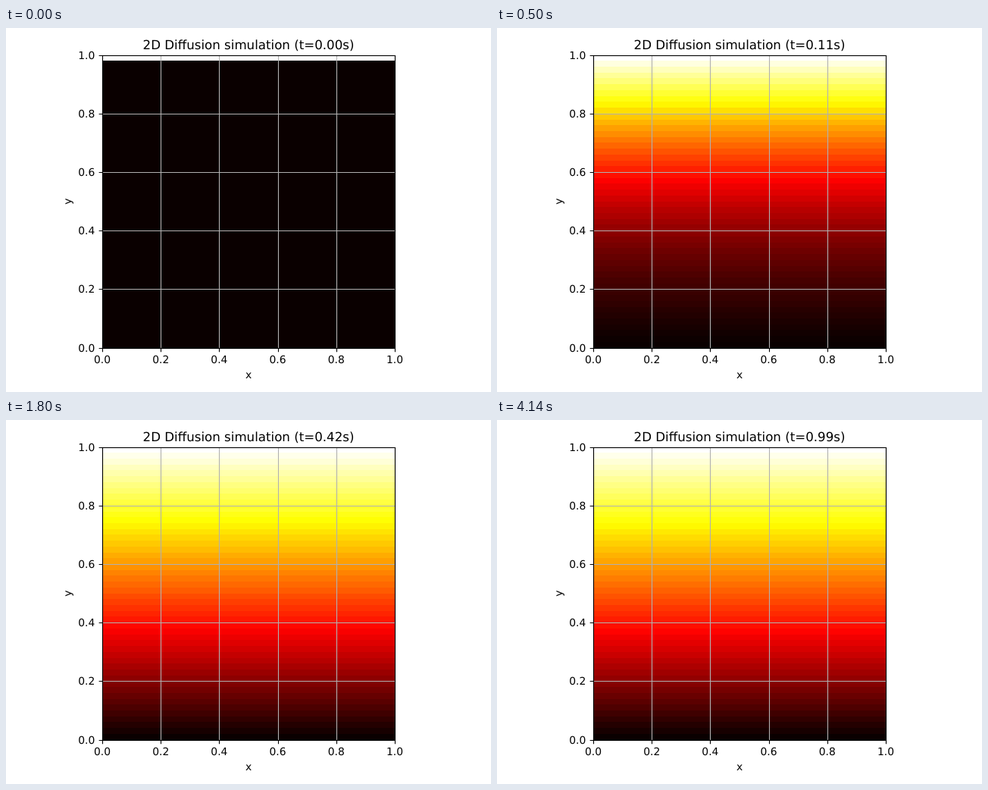
Animation of 640x480 px, one loop 4.16 s. Source, as an HTML page:

```html
<!DOCTYPE html>
<html lang="en">
<head>
<meta charset="utf-8">
<title>2D Diffusion simulation</title>
<style>
  html, body { margin: 0; width: 100%; height: 100%; overflow: hidden; background: #fff; }
  svg { display: block; width: 640px; height: 480px; }
  text { font: 13.889px "DejaVu Sans", sans-serif; text-anchor: middle; text-rendering: geometricPrecision; }
  .title { font-size: 16.667px; }
  .end { text-anchor: end; }
  path, .spine { fill: none; stroke: #000; stroke-width: 1.11; }
  .grid { stroke: #b0b0b0; }
</style>
</head>
<body>
<svg id="stage" viewBox="0 0 640 480"></svg>
<script>
const svg = document.getElementById('stage');
const LEFT = 127, TOP = 35.6, SIZE = 386, BOTTOM = TOP + SIZE;
const CELLS = 50, STEPS_PER_FRAME = 120, FRAMES = 80;
const FRAME_TIME = STEPS_PER_FRAME * 0.25 / (CELLS - 1) ** 2;
const CYCLE = 260, CYCLE_STARTS = [0, 20, 120, 140, 240];
const LOOP = CYCLE * FRAMES / CYCLE_STARTS.length;

function add(tag, attributes, content = '') {
  const node = document.createElementNS('http://www.w3.org/2000/svg', tag);
  for (const [name, value] of Object.entries(attributes)) node.setAttribute(name, value);
  node.textContent = content;
  return svg.appendChild(node);
}

// Explicit heat equation: hot top edge, cold bottom edge, uniform along x.
function simulate() {
  let field = Array(CELLS).fill(0);
  field[CELLS - 1] = 1;
  const history = [field];
  while (history.length < FRAMES) {
    for (let step = 0; step < STEPS_PER_FRAME; step++) {
      field = field.map((u, j) => j === 0 || j === CELLS - 1
        ? u : u + 0.25 * (field[j - 1] + field[j + 1] - 2 * u));
    }
    history.push(field);
  }
  return history;
}

// Black, red, yellow, white in 256 levels.
function hot(u) {
  const level = Math.min(255, Math.floor(u * 256)) / 255;
  const ramp = (from, to, base = 0) => {
    const part = Math.min(1, Math.max(0, (level - from) / (to - from)));
    return Math.floor(255 * (base + (1 - base) * part));
  };
  return `rgb(${ramp(0, 0.365079, 0.0416)},${ramp(0.365079, 0.746032)},${ramp(0.746032, 1)})`;
}

const snap = v => Math.round(v) + 0.5;

const bands = Array.from({ length: CELLS }, (_, j) => {
  const edge = k => Math.round(BOTTOM - k * SIZE / CELLS);
  return add('rect', { x: LEFT, y: edge(j + 1), width: SIZE, height: edge(j) - edge(j + 1) });
});

const ticks = Array.from({ length: 6 }, (_, i) => ({
  label: (i / 5).toFixed(1),
  x: LEFT + i * SIZE / 5,
  y: BOTTOM - i * SIZE / 5
}));

const x0 = snap(LEFT), x1 = snap(LEFT + SIZE), y0 = snap(TOP), y1 = snap(BOTTOM);
for (const { x, y } of ticks) {
  add('path', { class: 'grid', d: `M${snap(x)} ${y0}V${y1}M${x0} ${snap(y)}H${x1}` });
}
for (const { label, x, y } of ticks) {
  add('path', { d: `M${snap(x)} ${y1}v4.86M${x0} ${snap(y)}h-4.86` });
  add('text', { x, y: 442 }, label);
  add('text', { class: 'end', x: 117.3, y: Math.round(y + 5) }, label);
}
add('rect', { class: 'spine', x: x0, y: y0, width: x1 - x0, height: y1 - y0 });
add('text', { x: 320, y: 462 }, 'x');
add('text', { transform: 'translate(86.3 228.6) rotate(-90)' }, 'y');
const title = add('text', { class: 'title', x: 320, y: 28 });

const history = simulate();
let shown = -1;

function render(ms) {
  const time = ms % LOOP;
  const cycle = Math.floor(time / CYCLE);
  const within = CYCLE_STARTS.filter(start => start <= time - cycle * CYCLE).length - 1;
  const frame = cycle * CYCLE_STARTS.length + within;
  if (frame === shown) return;
  shown = frame;
  bands.forEach((band, j) => band.setAttribute('fill', hot(history[frame][j])));
  title.textContent = `2D Diffusion simulation (t=${(frame * FRAME_TIME).toFixed(2)}s)`;
}

const start = performance.now();
function tick() {
  render(performance.now() - start);
  requestAnimationFrame(tick);
}
tick();
</script>
</body>
</html>
```
